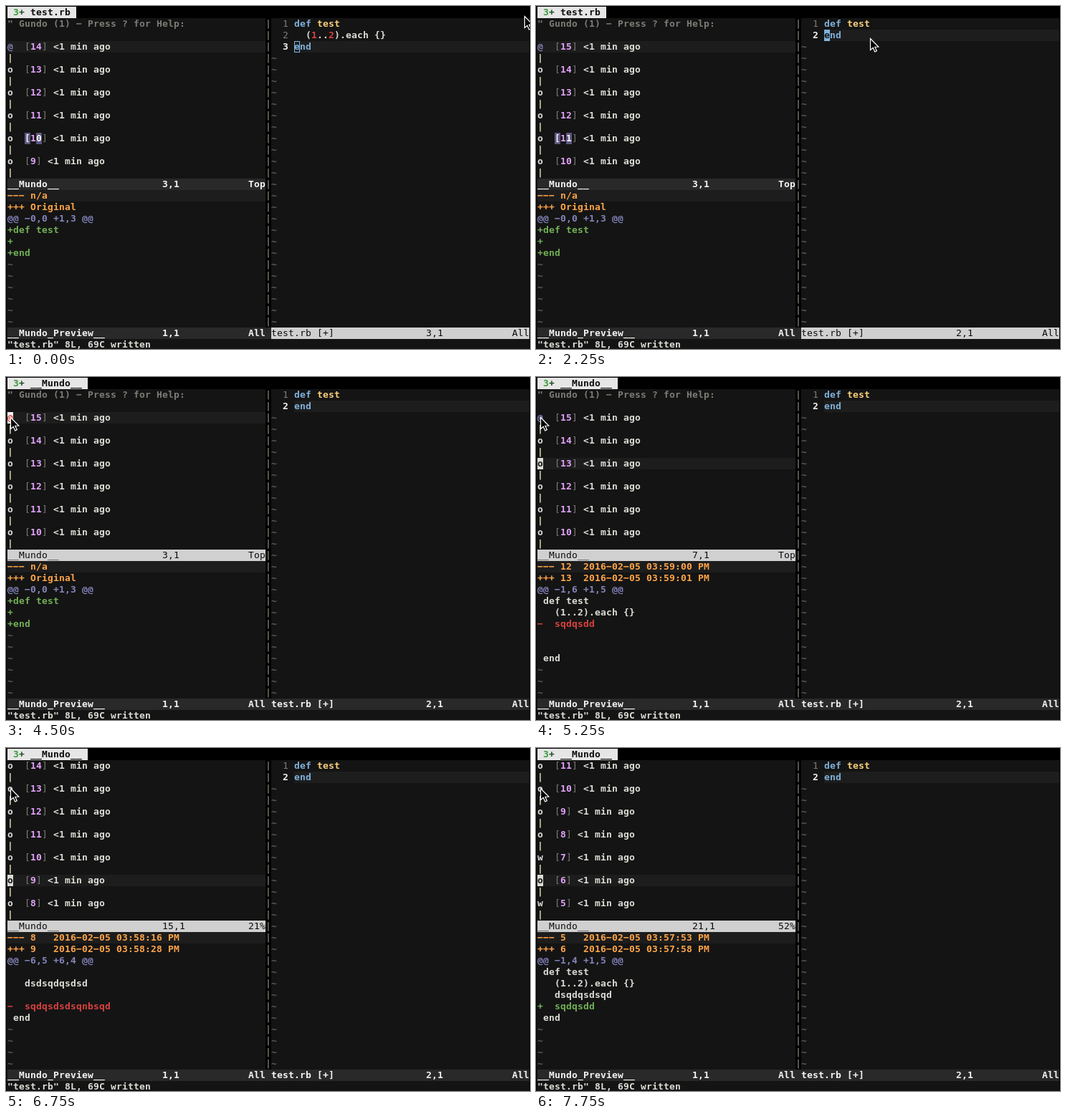
Animation, 731 px wide and 479 px high, one loop 8000 ms. Source, as an HTML page with a canvas:

```html
<!DOCTYPE html>
<html lang="en">
<head>
<meta charset="utf-8">
<title>Undo tree in a terminal editor</title>
<style>
html, body { margin: 0; width: 100%; height: 100%; overflow: hidden; background: #000; }
canvas { display: block; width: 731px; height: 479px; }
</style>
</head>
<body>
<canvas id="stage" width="731" height="479"></canvas>
<script>
const ctx = document.getElementById('stage').getContext('2d');
const LOOP = 8000, CW = 8, CH = 16, RIGHT = 46, CODE = 50;
const C = {
  bg: '#141414', line: '#1d1d1d', text: '#dcdcd6', dim: '#7c7c76', faint: '#5c5c5c',
  bar: '#e4dcb4', split: '#77776a', blue: '#7fb2dc', yellow: '#fad07a', red: '#d8413f',
  green: '#72b056', orange: '#ffa548', hunk: '#8484bc', purple: '#e2a2fb', match: '#5d5680',
  on: '#d0d0d0', off: '#292929', white: '#f4f4f4', tab: '#e6e6e6', ink: '#0c0c0c'
};
const X = col => 2 + col * CW;
const Y = row => 1 + row * CH;

function fill(col, row, cols, color) {
  ctx.fillStyle = color;
  ctx.fillRect(X(col), Y(row), cols * CW, CH);
}

function put(col, row, str, color, weight = 'bold') {
  ctx.font = weight + ' 13px "DejaVu Sans Mono", "Noto Sans Mono", monospace';
  ctx.fillStyle = color;
  [...str.replace(/-/g, '\u2212')].forEach((ch, i) => {
    if (ch !== ' ') ctx.fillText(ch, X(col + i), Y(row) + 12);
  });
}

function block(col, row, ch, bg, color = C.bg) {
  fill(col, row, 1, bg);
  put(col, row, ch, color);
}

// Last entry whose start time has been reached
const at = (steps, t) => steps.filter(s => s[0] <= t).pop();

const pointer = [[0, 723, 14], [250, 486, 71], [500, 465, 48], [750, 466, 45],
  [2750, 133, 60], [3000, 45, 76], [3250, 8, 58], [3500, 6, 56]];
const moves = [[0, 3], [4750, 5], [5250, 7], [5750, 9], [6000, 11], [6250, 13],
  [6750, 15], [7000, 17], [7500, 19], [7750, 21]];

// Lines of the edited text that reappear in the diffs
const DEF = ' def test', EACH = '   (1..2).each {}', END = ' end';
const A = '  dsqdqsdsqd', B = '  sqdqsdd', D = '  dsdsqdqsdsd', E = '  sqdqsdsdsqnbsqd';
const diffs = {
  14: ['59:01', '59:02', '-1,5 +1,3', DEF, EACH, '-' + B, '-', END],
  13: ['59:00', '59:01', '-2,5 +2,4', EACH, ' ' + B, '', '', '-', END],
  12: ['58:59', '59:00', '-3,5 +3,4', ' ' + B, '', '', '-', END],
  11: ['58:45', '58:59', '-1,6 +1,5', DEF, EACH, '-' + A, ' ' + B, '', ''],
  10: ['58:28', '58:45', '-4,6 +4,5', ' ' + B, '', '', '-' + D, '', END],
  9: ['58:16', '58:28', '-6,5 +6,4', '', ' ' + D, '', '-' + E, END],
  8: ['58:05', '58:16', '-5,4 +5,6', '', '', ' ' + D, '+', '+' + E, END],
  7: ['57:58', '58:05', '-2,4 +2,7', EACH, ' ' + A, ' ' + B, '+', '+', '+' + D, END],
  6: ['57:53', '57:58', '-1,4 +1,5', DEF, EACH, ' ' + A, '+' + B, END]
};
diffs[13] = ['59:00', '59:01', '-1,6 +1,5', DEF, EACH, '-' + B, '', '', END];
diffs[14] = ['59:01', '59:02', '-1,5 +1,3', DEF, EACH, '-', '-', END];

function status(col, row, name, pos, where, active) {
  const color = active ? C.ink : C.white, weight = active ? 'normal' : 'bold';
  fill(col, row, 45, active ? C.on : C.off);
  put(col, row, name, color, weight);
  put(col + 27, row, pos, color, weight);
  put(col + 42, row, where, color, weight);
}

function drawTabs(inTree) {
  const name = inTree ? '__Mundo__' : 'test.rb';
  fill(0, 0, 91, '#000');
  fill(0, 0, name.length + 5, C.tab);
  put(1, 0, '3', '#3a9c3c');
  put(2, 0, '+', '#1d5020');
  put(4, 0, name, C.ink);
}

function drawTree(t, line, inTree) {
  const newest = t < 2250 ? 14 : 15;
  const top = Math.max(1, line - 10);
  fill(0, line - top + 1, 45, C.line);
  for (let row = 1; row <= 14; row++) {
    const n = top + row - 1;
    if (n === 1) put(0, row, '" Gundo (1) - Press ? for Help:', C.dim);
    if (n < 3) continue;
    if (n % 2 === 0) { put(0, row, '|', C.bar); continue; }
    const id = newest - (n - 3) / 2, num = String(id);
    const mark = n === 3 ? '@' : id === 7 || id === 5 ? 'w' : 'o';
    put(0, row, mark, n === 3 ? C.hunk : C.text);
    put(3, row, '[', C.dim, 'normal');
    put(4, row, num, C.purple);
    put(4 + num.length, row, ']', C.dim, 'normal');
    put(6 + num.length, row, '<1 min ago', C.text);
    if (!inTree && row === 11) {
      block(3, row, '[', C.match, C.white);
      block(5, row, num[1], C.match, C.white);
    }
    if (inTree && n === line) {
      if (t < 4500) block(1, row, ' ', C.white);
      else block(0, row, mark, n === 3 ? C.white : C.text, n === 3 ? C.red : C.bg);
    }
  }
  const where = top === 1 ? 'Top' : Math.floor((top - 1) * 100 / 19) + '%';
  status(0, 15, '__Mundo__', line + (inTree && t < 4500 ? ',2' : ',1'), where, inTree);
}

function drawPreview(line) {
  const id = (33 - line) / 2, diff = diffs[id];
  const stamp = (n, time) => String(n).padEnd(4) + '2016-02-05 03:' + time + ' PM';
  const body = diff ? diff.slice(3) : ['+def test', '+', '+end'];
  fill(0, 16, 45, C.line);
  put(0, 16, '--- ' + (diff ? stamp(id - 1, diff[0]) : 'n/a'), C.orange);
  put(0, 17, '+++ ' + (diff ? stamp(id, diff[1]) : 'Original'), C.orange);
  put(0, 18, '@@ ' + (diff ? diff[2] : '-0,0 +1,3') + ' @@', C.hunk);
  for (let row = 19; row < 28; row++) {
    const s = body[row - 19];
    if (s === undefined) put(0, row, '~', C.faint);
    else put(0, row, s, s[0] === '+' ? C.green : s[0] === '-' ? C.red : C.text);
  }
  status(0, 28, '__Mundo_Preview__', '1,1', 'All', false);
}

function drawCode(t, inTree) {
  const last = t < 2250 ? 3 : 2;
  const current = t < 1250 ? 3 : 2;
  fill(CODE, current, 41, C.line);
  for (let row = 1; row < 28; row++) {
    if (row <= last) {
      const here = row === current;
      put(48, row, String(row), here ? C.white : C.dim, here ? 'bold' : 'normal');
    } else put(RIGHT, row, '~', C.faint);
  }
  put(CODE, 1, 'def', C.blue);
  put(CODE + 4, 1, 'test', C.yellow);
  if (last === 3) {
    put(CODE + 2, 2, '( .. ).each {}', C.text);
    put(CODE + 3, 2, '1  2', C.red);
  }
  put(CODE, last, 'end', C.blue);

  if (t < 750) {
    ctx.strokeStyle = C.blue;
    ctx.lineWidth = 1;
    ctx.strokeRect(X(CODE) + .5, Y(3) + .5, CW - 1, CH - 1);
  } else if (t >= 1250 && t < 2250) block(CODE + 8, 2, '.', C.text);
  else if (!inTree) block(CODE, last, 'e', C.blue);

  const pos = t < 1250 ? '3,1' : t < 2250 ? '2,9' : '2,1';
  status(RIGHT, 28, 'test.rb [+]', pos, 'All', !inTree);
}

function drawPointer(x, y) {
  const shape = [[0, 0], [0, 16], [3.7, 12.7], [6.2, 18.4], [8.8, 17.3], [6.3, 11.7], [11.3, 11.5]];
  ctx.beginPath();
  shape.forEach(([dx, dy]) => ctx.lineTo(x + dx + .5, y + dy + .5));
  ctx.closePath();
  ctx.fillStyle = '#000';
  ctx.fill();
  ctx.strokeStyle = '#fff';
  ctx.lineWidth = 1.2;
  ctx.stroke();
}

function draw(t) {
  const inTree = t >= 3500;
  const line = at(moves, t)[1];
  ctx.fillStyle = '#000';
  ctx.fillRect(0, 0, 731, 479);
  ctx.fillStyle = C.bg;
  ctx.fillRect(1, 17, 729, 462);
  drawTabs(inTree);
  for (let row = 1; row < 28; row++) {
    fill(45, row, 1, '#000');
    put(45, row, '|', C.split);
  }
  fill(45, 28, 1, C.off);
  drawTree(t, line, inTree);
  drawPreview(line);
  drawCode(t, inTree);
  put(0, 29, '"test.rb" 8L, 69C written', C.text);
  if (t >= 2000 && t < 2250) put(80, 29, 'd', C.text);
  const [, x, y] = at(pointer, t);
  drawPointer(x, y);
}

const start = performance.now();
function tick() {
  draw((performance.now() - start) % LOOP);
  requestAnimationFrame(tick);
}
tick();
</script>
</body>
</html>
```
